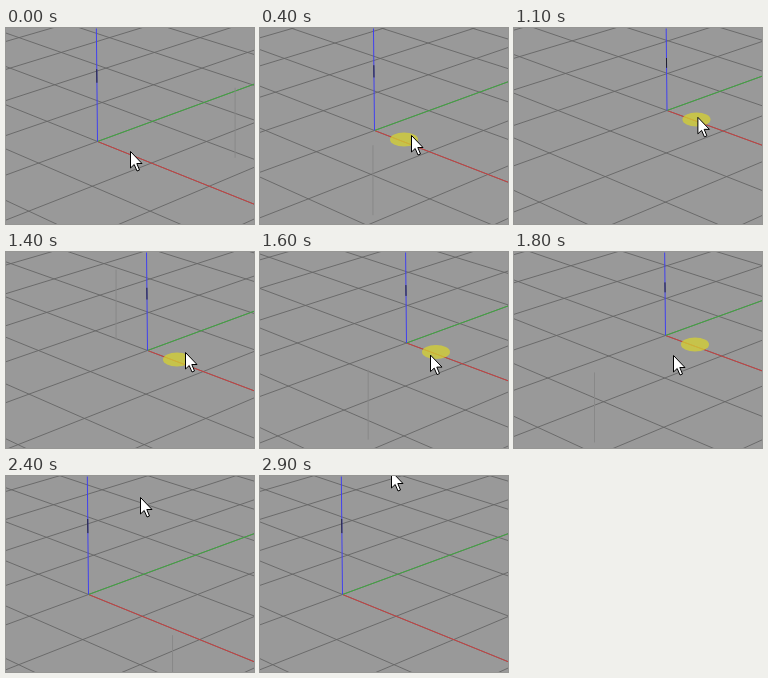
Recreate the animation shown at these times as an HTML page with a canvas. Size 248 by 196 pixels, loop 3000 ms.

```html
<!DOCTYPE html>
<html lang="en">
<head>
<meta charset="utf-8">
<title>Panning viewport</title>
<style>
  html, body { margin: 0; width: 100%; height: 100%; overflow: hidden; background: #999; }
  canvas { display: block; width: 100vw; height: 100vh; }
</style>
</head>
<body>
<canvas width="248" height="196"></canvas>
<script>
const canvas = document.querySelector('canvas');
const ctx = canvas.getContext('2d');
const LOOP = 3000, STEP = 100, PAN_END = 2400;

// Vanishing points stay put while the camera pans.
const RED_VP = [-1441, -500], GREEN_VP = [1765, -500], CELL = 0.034, EXTENT = 10;

// Key poses: time, origin x and y, pointer x and y.
const keys = [
  [0, 91, 113, 124, 123],
  [400, 114, 102, 151, 107],
  [800, 164, 66, 184, 81],
  [1400, 141, 98, 179, 100],
  [1800, 151, 83, 159, 103],
  [PAN_END, 82, 118, 134, 21],
  [2700, 82, 118, 131, -5],
  [LOOP, 82, 118, 131, -5]
];

// Speed at a key: zero at turning points and rests.
function speed(i, column) {
  const a = keys[i - 1], b = keys[i], c = keys[i + 1];
  if (!a || !c || (b[column] - a[column]) * (c[column] - b[column]) <= 0) return 0;
  return (c[column] - a[column]) / (c[0] - a[0]);
}

// Cubic curve through the key poses.
function poseAt(t) {
  const i = keys.findIndex((key, n) => t < keys[n + 1][0]);
  const a = keys[i], b = keys[i + 1], span = b[0] - a[0], s = (t - a[0]) / span;
  const value = column => a[column]
    + (b[column] - a[column]) * s * s * (3 - 2 * s)
    + span * s * (1 - s) * (speed(i, column) * (1 - s) - speed(i + 1, column) * s);
  return { origin: [value(1), value(2)], pointer: [value(3), value(4)] };
}

function project(origin, x, y) {
  const u = -x * CELL, v = y * CELL, w = 1 + u + v;
  return origin.map((o, i) => (o + u * RED_VP[i] + v * GREEN_VP[i]) / w);
}

function line(from, to, color, width = 1) {
  ctx.strokeStyle = color;
  ctx.lineWidth = width;
  ctx.beginPath();
  ctx.moveTo(from[0] + 0.5, from[1] + 0.5);
  ctx.lineTo(to[0] + 0.5, to[1] + 0.5);
  ctx.stroke();
}

function drawGrid(origin) {
  const at = (x, y) => project(origin, x, y);
  for (let i = -EXTENT; i <= EXTENT; i++) {
    line(at(-EXTENT, i), at(EXTENT, i), '#666', 0.9);
    line(at(i, -EXTENT), at(i, EXTENT), '#666', 0.9);
  }
  line(origin, at(EXTENT, 0), '#c84040');
  line(origin, at(0, EXTENT), '#3fa83f');
}

function drawUpright([x, y]) {
  const at = share => [x - (1 - share) * y / 100, share * y];
  line(at(0), [x, y], '#4040f0');
  line(at(0.36), at(0.48), '#202030');
}

// A faint streak flickers at a new place in some steps of the pan.
function drawStreak(t) {
  const random = seed => Math.abs(Math.sin(seed * 12.9898) * 43758.5453) % 1;
  const step = t / STEP;
  if (t > PAN_END || step % 2) return;
  const x = random(step + 1) * canvas.width, top = random(step + 50) * canvas.height;
  line([x, top], [x, top + 70], '#888');
}

function drawDisc([x, y]) {
  ctx.fillStyle = 'rgba(214, 210, 50, 0.75)';
  ctx.beginPath();
  ctx.ellipse(x + 30, y + 9.5, 14, 7, 0, 0, 2 * Math.PI);
  ctx.fill();
}

function drawPointer([x, y]) {
  const outline = [[0, 0], [0, 16.5], [3.7, 13], [6.5, 19.5], [9, 18.5], [6.3, 12], [11.5, 12]];
  ctx.beginPath();
  outline.forEach(([dx, dy]) => ctx.lineTo(x + dx + 0.5, y + dy + 0.5));
  ctx.closePath();
  ctx.fillStyle = '#fff';
  ctx.fill();
  ctx.strokeStyle = '#000';
  ctx.lineWidth = 1;
  ctx.stroke();
}

function draw(now) {
  const t = Math.floor(now % LOOP / STEP) * STEP;
  const { origin, pointer } = poseAt(t);
  ctx.fillStyle = '#999';
  ctx.fillRect(0, 0, canvas.width, canvas.height);
  drawGrid(origin);
  drawStreak(t);
  drawUpright(origin);
  if (t >= 200 && t < 2100) drawDisc(origin);
  drawPointer(pointer);
}

const start = performance.now();
function tick() {
  draw(performance.now() - start);
  requestAnimationFrame(tick);
}
tick();
</script>
</body>
</html>
```
